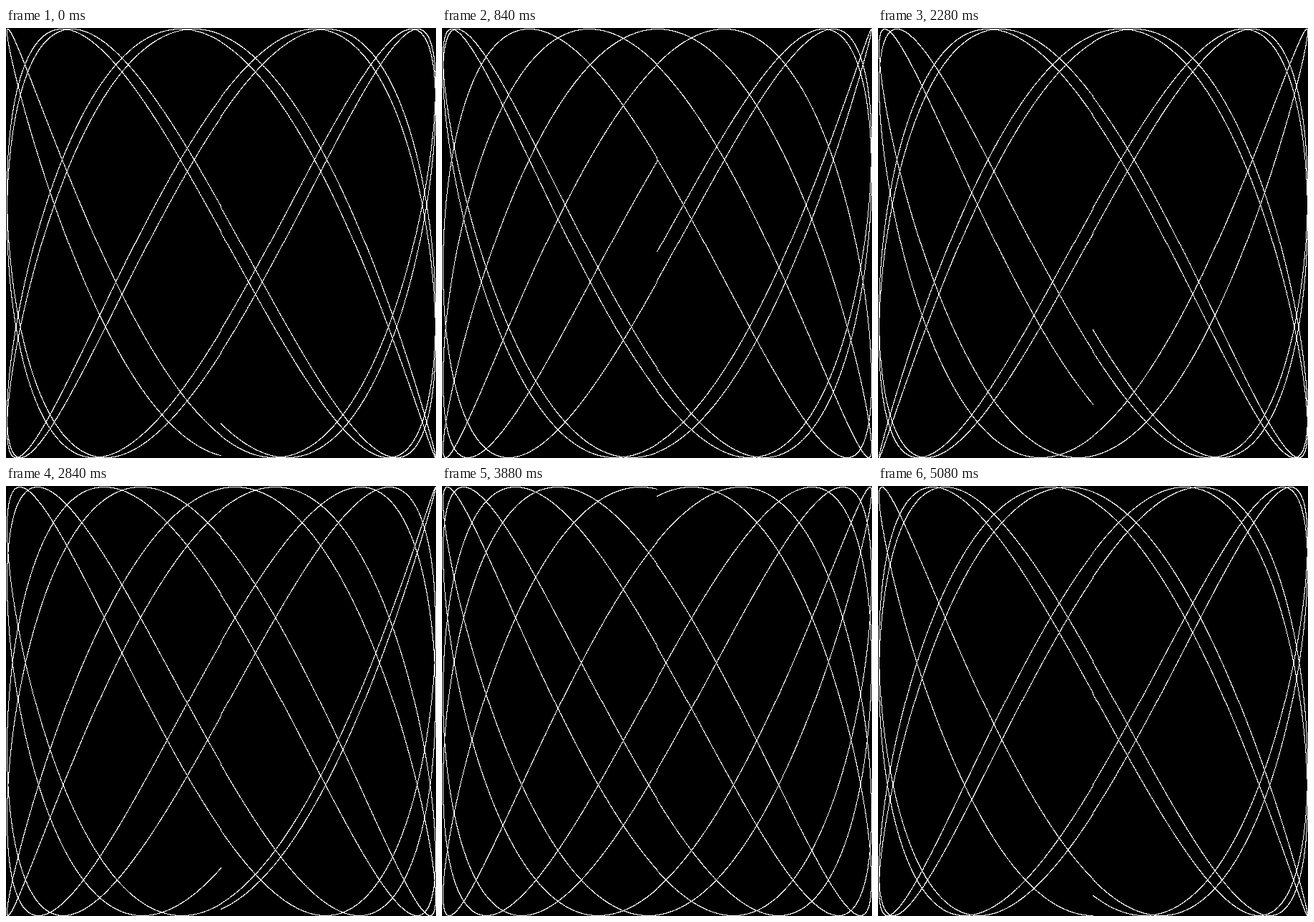
These frames come from a looping animation (601x601 px, 5120 ms). An HTML page with a canvas:

```html
<!DOCTYPE html>
<html lang="en">
<head>
<meta charset="utf-8">
<title>Lissajous figure</title>
<style>
  html, body { margin: 0; width: 100%; height: 100%; overflow: hidden; background: #000; }
  canvas { display: block; width: 601px; height: 601px; image-rendering: pixelated; }
</style>
</head>
<body>
<canvas id="stage" width="601" height="601"></canvas>
<script>
  const RADIUS = 300;
  const SIDE = 2 * RADIUS + 1;
  const CYCLES = 5;             // full swings of x
  const RES = 0.001;            // angular step
  const FREQ = 1.8139808639;    // y swings per x swing
  const START_PHASE = 1;
  const PHASE_STEP = 0.1;
  const STEPS = 128;
  const STEP_MS = 40;
  const BLACK = 0xff000000;
  const WHITE = 0xffffffff;

  const ctx = document.getElementById('stage').getContext('2d');
  const image = ctx.createImageData(SIDE, SIDE);
  const pixels = new Uint32Array(image.data.buffer);

  // Truncating toward zero leaves the small kinks on the centre lines.
  const toPixel = v => RADIUS + Math.trunc(v * RADIUS + 0.5);

  function draw(step) {
    const phase = START_PHASE + step * PHASE_STEP;
    pixels.fill(BLACK);
    for (let t = 0; t < CYCLES * 2 * Math.PI; t += RES) {
      const x = toPixel(Math.sin(t));
      const y = toPixel(Math.sin(t * FREQ + phase));
      pixels[y * SIDE + x] = WHITE;
    }
    ctx.putImageData(image, 0, 0);
  }

  let shown = 0;
  function tick(now) {
    const step = Math.floor(Math.max(0, now) / STEP_MS + 1e-6) % STEPS;
    if (step !== shown) draw(shown = step);
    requestAnimationFrame(tick);
  }

  draw(shown);
  requestAnimationFrame(tick);
</script>
</body>
</html>
```
